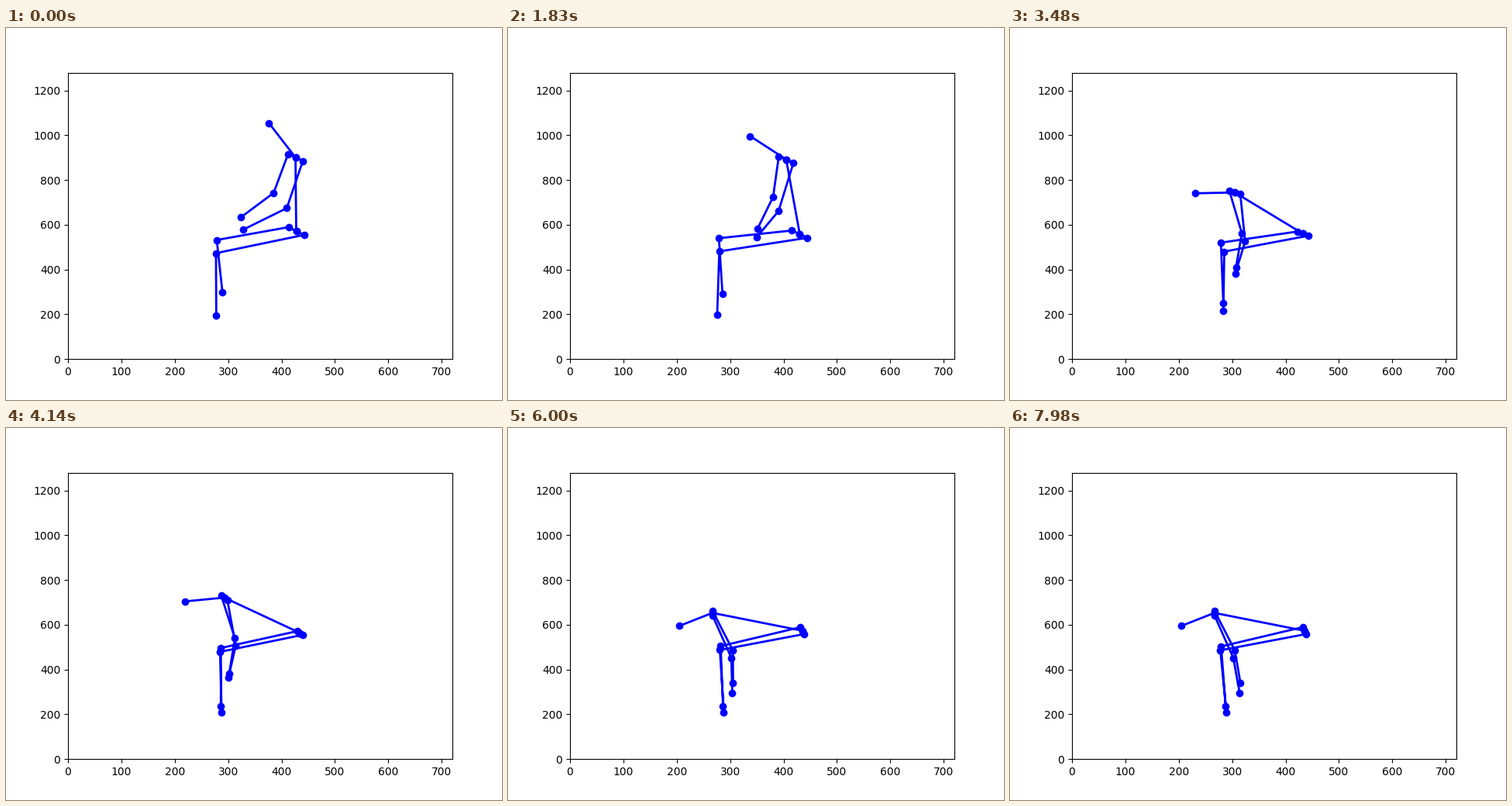
A matplotlib script for the animation above (8 s loop, 640 by 480 pixels).

```python
import numpy as np
import matplotlib.pyplot as plt
from matplotlib.animation import FuncAnimation

WIDTH, HEIGHT = 720, 1280
LOOP_MS, FRAMES = 8000, 250


def ease(ms, start, end):
    u = np.clip((ms - start) / (end - start), 0, 1)
    return u * u * (3 - 2 * u)


def bone(length, angle):
    """Vector in pixels; the angle runs from straight up towards the left."""
    a = np.radians(angle)
    return length * np.array([-np.sin(a), -np.cos(a)])


def skeleton(ms):
    nod = ease(ms, 0, 840)          # head tips forward
    drop = ease(ms, 1000, 1830)     # forearms come down
    bend = ease(ms, 1200, 4000)     # torso folds over
    swing = ease(ms, 2850, 4140)    # body turns side-on
    sink = ease(ms, 4500, 6000)     # last part of the fold
    settle = ease(ms, 6000, 7980)   # hands drift

    # Centre line, bone by bone from the pelvis
    pelvis = np.array([374.5 + 2 * drop + 3 * swing,
                       262 + 4 * drop - 1.5 * swing - 3 * sink])
    neck = pelvis + bone(95 + 3 * drop + 10 * swing + 10 * sink,
                         0.6 + 1.8 * nod + 62.6 * bend + 13.8 * sink)
    head = neck + bone(56 - 5 * bend - 5 * sink,
                       37.7 + 13.8 * nod + 44 * bend + 16 * sink)
    elbow = neck + bone(59, 160.5 + 2.5 * nod + 31 * bend + 11.5 * sink)
    wrist = elbow + bone(57 - 13 * drop, 121 - 3 * nod + 26 * drop
                         + 25 * bend + 12 * sink + 9 * settle)
    knee = pelvis + bone(105 + 3 * sink + 2 * settle,
                         101 - 3.5 * drop + 4.5 * swing)
    ankle = knee + bone(74 + 3 * drop + 2 * sink,
                        183 - 2.3 * drop + 2.3 * sink + 2 * settle)

    # Each side lies half a spread away from the centre line
    spread = {
        "shoulder": (9.5 - 5.5 * swing - 4 * sink, 4.5 - 4 * bend + 2.5 * swing),
        "elbow": (8.5 - 5 * drop - 3 * swing - 1.5 * sink, 9.8 - 5 * bend),
        "wrist": (1.5 - 2 * drop, 8 - 2.5 * drop - 3 * swing + 4 * sink),
        "hip": (10 - 7 * swing - sink, 5 - 2.5 * bend + 2 * sink),
        "knee": (6 * bend - 6 * swing - 0.5, 8.5 - 6 * swing),
        "ankle": (4.5 * bend - 4, 15 - 11 * bend),
    }

    def across(outer, middle, root, names):
        centres = np.array([outer, middle, root])
        half = np.array([spread[n] for n in names])
        return np.vstack([centres - half, root, (centres + half)[::-1]])

    return [np.array([head, neck, pelvis]),
            across(wrist, elbow, neck, ("wrist", "elbow", "shoulder")),
            across(ankle, knee, pelvis, ("ankle", "knee", "hip"))]


def to_data(points):
    x = (points[:, 0] - 80) * WIDTH / 496
    y = (427.2 - points[:, 1]) * HEIGHT / 369.6
    return x, y


fig, ax = plt.subplots(figsize=(6.4, 4.8), dpi=100)
ax.set_xlim(0, WIDTH)
ax.set_ylim(0, HEIGHT)
limbs = [ax.plot([], [], "bo-", lw=2)[0] for _ in range(3)]


def update(i):
    for limb, chain in zip(limbs, skeleton(i * LOOP_MS / FRAMES)):
        limb.set_data(*to_data(chain))
    return limbs


anim = FuncAnimation(fig, update, frames=FRAMES, interval=LOOP_MS // FRAMES,
                     repeat=True, repeat_delay=0)
plt.show()
```
